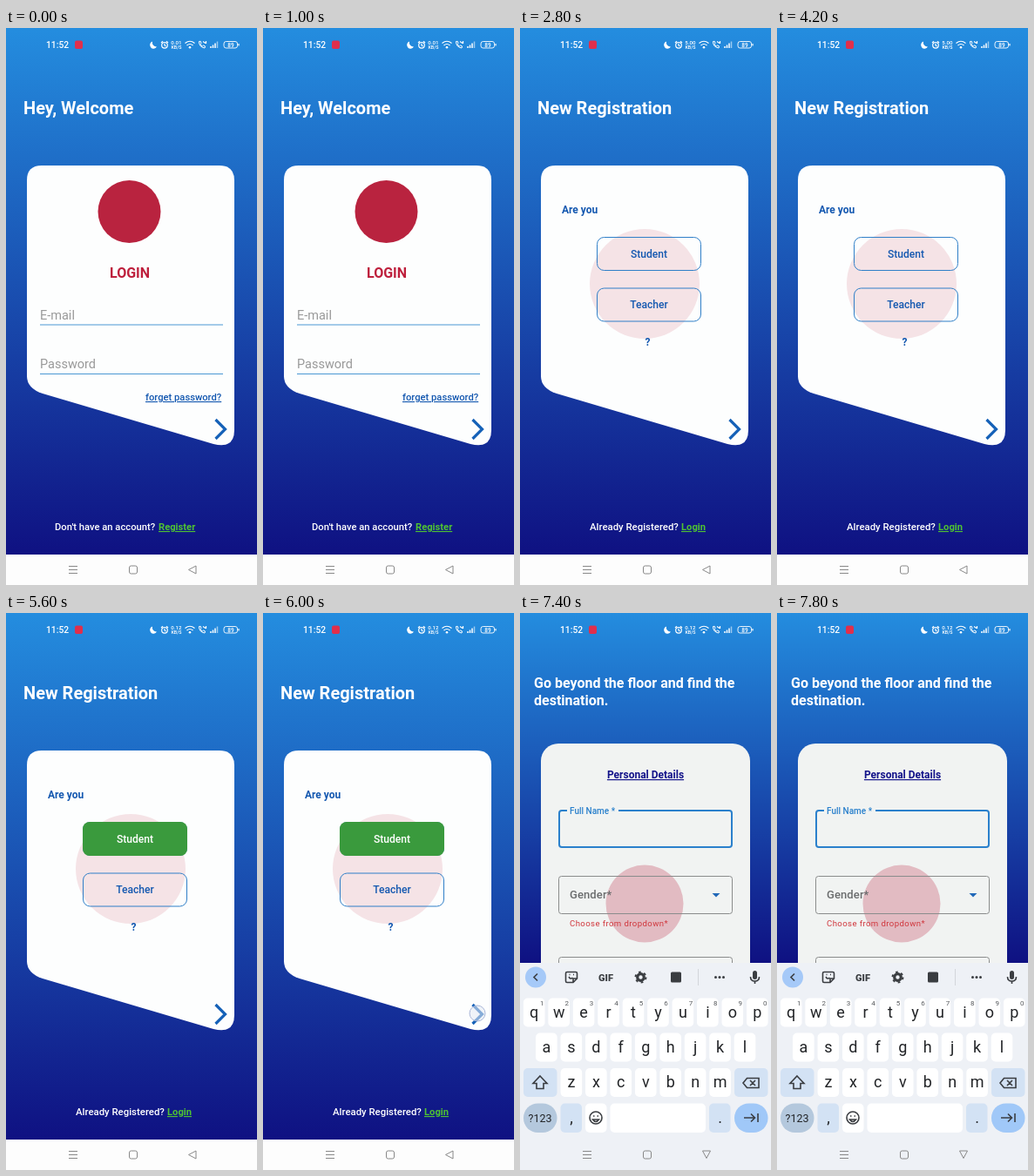
An HTML page for the animation above (8 s loop, 288 by 640 pixels).

```html
<!DOCTYPE html>
<html lang="en">
<head>
<meta charset="utf-8">
<title>Sign-up flow</title>
<style>
html, body { margin: 0; width: 100%; height: 100%; overflow: hidden; background: #fff; }
svg { display: block; width: 100vw; height: 100vh; font-family: Roboto, "Noto Sans", sans-serif; }
.title { font-size: 20px; font-weight: 700; fill: #fff; }
.foot { font-size: 11.2px; font-weight: 500; fill: #fff; }
.link { font-size: 11.2px; font-weight: 700; fill: #4fc332; text-decoration: underline; }
.hint { font-size: 14.5px; fill: #999; }
.card { fill: #fdfefe; }
.arrow { fill: none; stroke: #1662b8; stroke-width: 3.2; }
.ask { font-size: 12px; font-weight: 700; fill: #1458b0; }
.btn { fill: none; stroke: #2f7fc8; }
.btnText { font-size: 12.1px; font-weight: 500; fill: #1458b0; text-anchor: middle; }
.box { fill: none; stroke: #8a8c8c; }
.label { font-size: 12px; font-weight: 500; fill: #6a6c6d; }
.wide { font-size: 13px; letter-spacing: .1px; }
.seal { fill: #b9233f; }
.line { fill: none; stroke: #888; }
.icon { fill: none; stroke: #fff; }
.tiny { font-size: 5.4px; font-weight: 500; fill: #fff; text-anchor: middle; }
.key { fill: #fff; }
.soft { fill: #d3e2f4; }
.glyph { font-size: 18px; fill: #222427; text-anchor: middle; }
.digit { font-size: 8px; fill: #55585c; text-anchor: middle; }
.tool { fill: none; stroke: #3a3d41; stroke-width: 1.6; }
.dark { fill: #3a3d41; }
</style>
</head>
<body>
<svg viewBox="0 0 288 640">
  <defs>
    <linearGradient id="sky" x2="0" y2="1">
      <stop stop-color="#248ddf"/><stop offset="1" stop-color="#0f1182"/>
    </linearGradient>
    <path id="sheet" d="M41 158H245Q262 158 262 175V462Q262 484 238 478L42 420Q24 414 24 400V175Q24 158 41 158Z"/>
    <path id="next" d="M240.500 450L251.500 461L240.500 472"/>
  </defs>

  <g id="login">
    <rect width="288" height="605" fill="url(#sky)"/>
    <text class="title" x="20" y="99">Hey, Welcome</text>
    <use href="#sheet" class="card"/>
    <circle class="seal" cx="141.500" cy="211" r="36"/>
    <text x="119" y="287" font-size="16" font-weight="700" fill="#be1f3c">LOGIN</text>
    <text class="hint" x="39" y="335">E-mail</text>
    <text class="hint" x="39" y="391">Password</text>
    <path d="M39 341H249M39 397.500H249" stroke="#4a97d4"/>
    <text x="160" y="428" font-size="11.2" font-weight="500" fill="#1458b0" text-decoration="underline">forget password?</text>
    <use href="#next" class="arrow"/>
    <text class="foot" x="56" y="577">Don't have an account?</text>
    <text class="link" x="175" y="577">Register</text>
  </g>

  <g id="role">
    <rect width="288" height="605" fill="url(#sky)"/>
    <text class="title" x="20" y="99">New Registration</text>
    <use href="#sheet" class="card"/>
    <circle class="seal" cx="143" cy="294" r="63" opacity=".12"/>
    <text class="ask" x="48" y="213">Are you</text>
    <rect class="btn" x="88.500" y="240.500" width="119" height="38" rx="8"/>
    <text class="btnText" x="148" y="264">Student</text>
    <g id="picked">
      <rect x="88" y="240" width="120" height="39" rx="8" fill="#3a9a3d"/>
      <text class="btnText" x="148" y="264" style="fill:#fff">Student</text>
    </g>
    <rect class="btn" x="88.500" y="299" width="119" height="38" rx="8"/>
    <text class="btnText" x="148" y="322">Teacher</text>
    <text class="ask" x="143.500" y="365">?</text>
    <use href="#next" class="arrow"/>
    <text class="foot" x="80" y="577" style="font-size:11.4px">Already Registered?</text>
    <text class="link" x="185" y="577">Login</text>
  </g>

  <g id="form">
    <rect id="formSky" width="288" height="605" fill="url(#sky)"/>
    <g font-size="16" font-weight="700" fill="#fff">
      <text x="16" y="86">Go beyond the floor and find the</text>
      <text x="16" y="106">destination.</text>
    </g>
    <rect x="24" y="150" width="240" height="367" rx="20" fill="#f1f3f2"/>
    <circle class="seal" cx="143" cy="334" r="44.500" opacity=".27"/>
    <text x="144" y="190" font-size="12" font-weight="700" fill="#14148a" text-anchor="middle" text-decoration="underline">Personal Details</text>
    <g id="idle">
      <rect class="box" x="44.500" y="226.500" width="199" height="43" rx="3"/>
      <text class="label" x="57" y="252">Full Name *</text>
    </g>
    <g id="focus">
      <rect x="45" y="227" width="198" height="42" rx="3" fill="none" stroke="#2a80cc" stroke-width="2"/>
      <path d="M54 227H113" stroke="#f1f3f2" stroke-width="3"/>
      <text x="57" y="230.500" font-size="10" font-weight="500" fill="#2a80cc">Full Name *</text>
    </g>
    <rect class="box" x="44.500" y="302.500" width="199" height="43" rx="3"/>
    <text class="label wide" x="57" y="328">Gender*</text>
    <path d="M220.500 322H229.500L225 326.500Z" fill="#2068b8"/>
    <text x="57" y="360" font-size="9.6" letter-spacing=".4" fill="#d0363c">Choose from dropdown*</text>
    <rect class="box" x="44.500" y="395.500" width="199" height="43" rx="3"/>
    <text class="label wide" x="57" y="421">Date of Birth *</text>
    <g fill="none" stroke="#4a4c4e">
      <rect x="218.500" y="411.500" width="13" height="13" rx="1.500" stroke-width="1.500"/>
      <path d="M218 413H232" stroke-width="3"/>
      <path d="M221.500 409V412M228.500 409V412" stroke-width="1.600"/>
      <path d="M221 418H230M221 421.500H230" stroke-width="2" stroke-dasharray="2 1.500"/>
    </g>
    <rect class="box" x="44.500" y="472.500" width="199" height="42" rx="3"/>
    <text class="label" x="57" y="497">E-mail*</text>
    <rect x="44" y="543" width="200" height="29" rx="10" fill="#4db850"/>
    <text x="145" y="561.500" font-size="11" font-weight="700" letter-spacing="1.2" fill="#fff" text-anchor="middle">Continue</text>
  </g>

  <g id="status">
    <text x="46" y="23" font-size="10.3" font-weight="500" fill="#fff">11:52</text>
    <rect x="79" y="14.500" width="9" height="9.500" rx="2" fill="#e02f4c"/>
    <path d="M168 15.500A4.200 4.200 0 1 0 173 21.500A4.800 4.800 0 0 1 168 15.500Z" fill="#fff"/>
    <g class="icon" stroke-width="1.200">
      <circle cx="182" cy="19.800" r="3.300"/>
      <path d="M182 17.800V20L183.500 21M178 17L180 15.200M186 17L184 15.200"/>
      <path d="M205.500 17.500Q211 13 216.500 17.500M207.500 20Q211 17 214.500 20"/>
      <path d="M221.500 15.500Q221.500 22 228 23L228.500 21L226.500 20L225.300 21Q223.500 20 223.200 18.500L224 17.300L223.300 15.300Z" stroke-width="1"/>
      <path d="M226 15.500L229 17.500M229.500 15V18"/>
      <path d="M235 23V21M237.500 23V19.500M240 23V17.500" stroke-width="1.500"/>
      <path d="M242.500 23V15.500" stroke-width="1.500" opacity=".55"/>
      <rect x="250" y="15.500" width="15.500" height="7.500" rx="2.500" stroke-width=".9"/>
      <path d="M267 18V20.500"/>
    </g>
    <circle cx="211" cy="22.300" r="1.300" fill="#fff"/>
    <text class="tiny" x="258" y="21.500" style="font-size:6.500px">89</text>
    <text class="tiny" x="195.500" y="24">KB/S</text>
    <text class="tiny" id="rateA" x="195.500" y="18.800" style="font-size:6.200px">0.01</text>
    <text class="tiny" id="rateB" x="195.500" y="18.800" style="font-size:6.200px">5.00</text>
    <text class="tiny" id="rateC" x="195.500" y="18.800" style="font-size:6.200px">0.12</text>
  </g>

  <g id="keys">
    <rect y="402" width="288" height="238" fill="#eef1f6"/>
    <circle cx="18" cy="418.500" r="12" fill="#a5c9f8"/>
    <g class="tool">
      <path d="M20 414.500L16 418.500L20 422.500"/>
      <path d="M54 412.500H64Q65.500 412.500 65.500 414V420L61 424.500H54Q52.500 424.500 52.500 423V414Q52.500 412.500 54 412.500ZM61 424V420H65"/>
      <path d="M56 418Q58 421.500 60.500 419M56.500 415.500H57.500M61 415.500H62"/>
      <circle cx="138.500" cy="418.500" r="3.800" stroke-width="3.200"/>
      <circle cx="138.500" cy="418.500" r="6" stroke-width="2" stroke-dasharray="2.700 3.580"/>
      <path d="M264.500 418Q264.500 423 269.500 423T274.500 418M269.500 423V426"/>
    </g>
    <text class="dark" x="98.500" y="422.500" font-size="11" font-weight="900" text-anchor="middle">GIF</text>
    <rect class="dark" x="173" y="412.500" width="12" height="12" rx="1.500"/>
    <path d="M204.500 409V428" stroke="#d2d5da"/>
    <g class="dark">
      <circle cx="224.500" cy="418.500" r="1.500"/><circle cx="229" cy="418.500" r="1.500"/><circle cx="233.500" cy="418.500" r="1.500"/>
      <rect x="267" y="411" width="5" height="10" rx="2.500"/>
    </g>
    <g id="letters"></g>
    <g class="soft">
      <rect x="4" y="523" width="38.500" height="33" rx="5"/>
      <rect x="246" y="523" width="38.500" height="33" rx="5"/>
      <rect x="46.500" y="563.500" width="24.500" height="33.500" rx="5"/>
      <rect x="217" y="563.500" width="24.500" height="33.500" rx="5"/>
    </g>
    <rect x="4" y="563.500" width="38.500" height="33.500" rx="16.500" fill="#b4c8dd"/>
    <rect x="246" y="563.500" width="38.500" height="33.500" rx="16.500" fill="#a0c8f8"/>
    <rect class="key" x="75" y="563.500" width="24.500" height="33.500" rx="5"/>
    <rect class="key" x="103.500" y="563.500" width="109.500" height="33.500" rx="5"/>
    <text class="glyph" x="23" y="585" style="font-size:12.500px">?123</text>
    <text class="glyph" x="59" y="586">,</text>
    <text class="glyph" x="229.500" y="586">.</text>
    <g class="tool" stroke="#222427">
      <path d="M23 532L31 540.500H27V546.500H19V540.500H15Z"/>
      <path d="M260.500 534.500H274V545.500H260.500L256 540ZM264 537L270 543M270 537L264 543"/>
      <circle cx="87" cy="580" r="7"/>
      <path d="M83.500 582Q87 587 90.500 582ZM84 578H85.500M88.500 578H90"/>
      <path d="M257 580H269M265 575.500L269.500 580L265 584.500M273 575V585"/>
    </g>
  </g>

  <rect id="bar" y="605" width="288" height="35" fill="#fdfdfd"/>
  <rect id="barKeys" y="605" width="288" height="35" fill="#eef1f6"/>
  <path class="line" d="M72 618.500H82M72 622.500H82M72 626.500H82"/>
  <rect class="line" x="141.500" y="618" width="9" height="9" rx="2"/>
  <path id="back" class="line" d="M209.500 622.500L218 618V627Z"/>
  <path id="hide" class="line" d="M214 626.500L209.500 618H218.500Z"/>

  <circle id="touch" r="9" fill="#e4e9f2" fill-opacity=".55" stroke="#a9b6d8"/>
</svg>

<script>
const LOOP = 8000;
const $ = id => document.getElementById(id);

// Hold each [time, value] until the next one.
function hold(id, prop, rows) {
  const frames = [...rows, [LOOP, rows.at(-1)[1]]].map(([t, v]) =>
    ({ offset: t / LOOP, [prop]: v, easing: 'steps(1, end)' }));
  $(id).animate(frames, { duration: LOOP, iterations: Infinity });
}

const show = (id, from, to = LOOP) =>
  hold(id, 'opacity', [...(from ? [[0, 0]] : []), [from, 1], ...(to < LOOP ? [[to, 0]] : [])]);

function addKeys(chars, firstX, y) {
  [...chars].forEach((c, i) => {
    const x = firstX + i * 28.45;
    let key = `<rect class="key" x="${x - 12.3}" y="${y}" width="24.6" height="33" rx="5"/>
      <text class="glyph" x="${x}" y="${y + 22}">${c}</text>`;
    if (chars.length === 10)
      key += `<text class="digit" x="${x + 9}" y="${y + 8.5}">${(i + 1) % 10}</text>`;
    $('letters').innerHTML += key;
  });
}

addKeys('qwertyuiop', 16.2, 442.5);
addKeys('asdfghjkl', 30.4, 482.5);
addKeys('zxcvbnm', 58.9, 523);

hold('role', 'opacity', [[0, 0], [2600, .6], [2800, 1]]);
hold('form', 'opacity', [[0, 0], [6400, .6], [6600, 1]]);
show('picked', 4800);
show('rateA', 0, 1600);
show('rateB', 1600, 5400);
show('rateC', 5400);
show('idle', 0, 7000);
show('focus', 7000);
show('barKeys', 7200);
show('back', 0, 7200);
show('hide', 7200);

const slide = y => `translate(0px, ${y}px)`;
hold('keys', 'transform', [[0, slide(240)], [7200, slide(70)], [7400, slide(0)]]);
hold('formSky', 'transform', [[0, 'scaleY(1)'], [7400, `scaleY(${402 / 605})`]]);

const at = (x, y) => `translate(${x}px, ${y}px)`;
hold('touch', 'transform', [[0, at(205, 580)], [4000, at(185, 257)], [5800, at(246, 460)], [6600, at(185, 252)]]);
hold('touch', 'opacity', [[0, 0], [2200, 1], [2600, 0], [4600, 1], [4800, 0], [6000, 1], [6400, 0], [6800, 1], [7000, 0]]);
</script>
</body>
</html>
```
